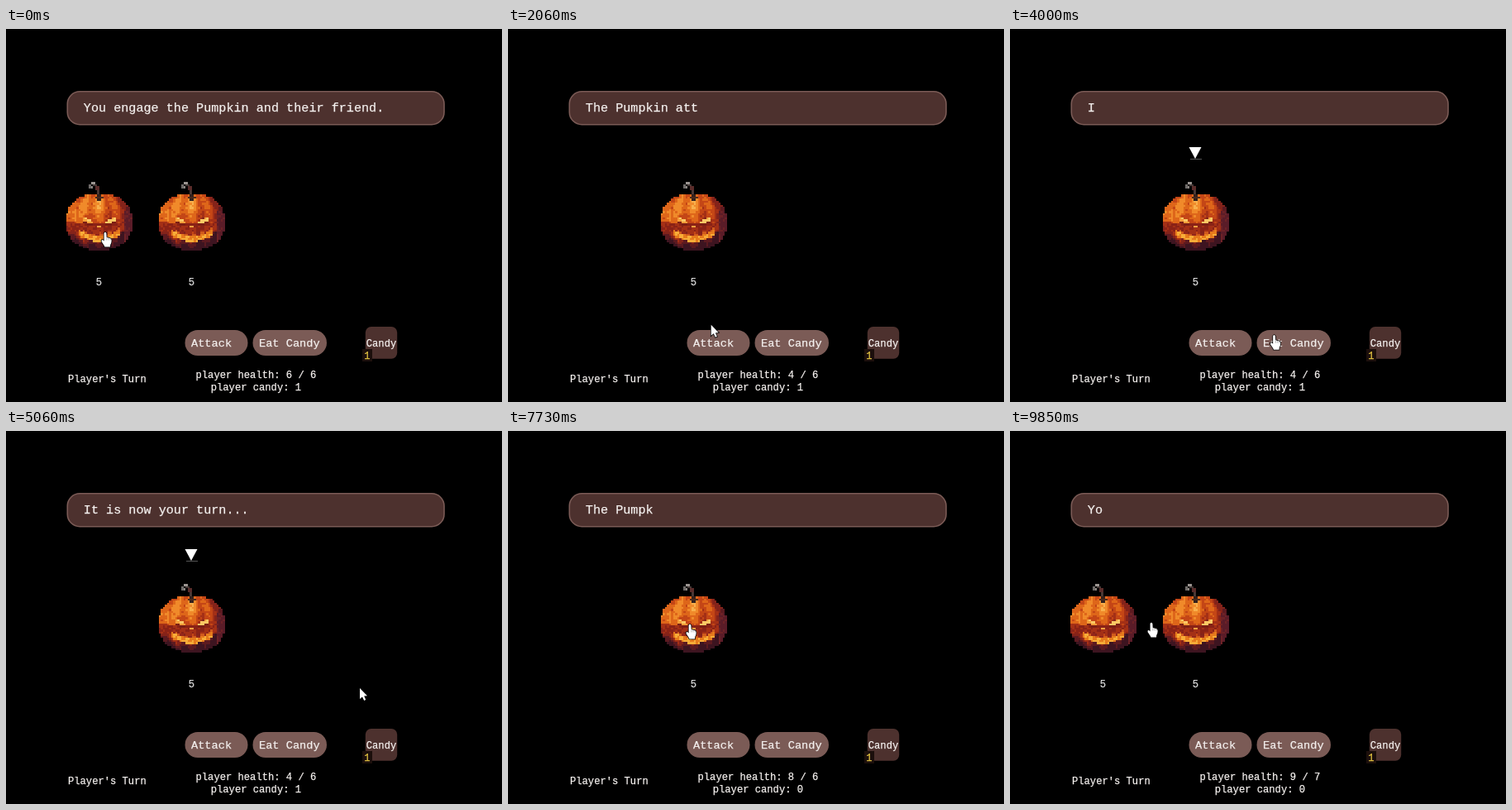
These frames come from a looping animation (600x452 px, 9880 ms). An HTML page with a canvas:

```html
<!DOCTYPE html>
<html lang="en">
<head>
<meta charset="utf-8">
<title>Pumpkin battle</title>
<style>
html, body { margin: 0; width: 100%; height: 100%; overflow: hidden; background: #000; }
canvas { display: block; }
</style>
</head>
<body>
<canvas id="stage" width="600" height="452"></canvas>
<script>
const ctx = document.getElementById('stage').getContext('2d');
const LOOP = 9880;
const CHAR_MS = 17;
const DARK = '#4d312e', LIGHT = '#7b5b56', WHITE = '#f4f0ee';

const ENGAGE = 'You engage the Pumpkin and their friend.';
const TARGET = 'You are targeting the Pumpkin.';
const HURT = 'The Pumpkin attacks you dealing 2 damage.';
const HIT = 'You attack the Pumpkin dealing 6 damage.';

// [start, text, characters already visible]
const messages = [
  [0, ENGAGE, ENGAGE.length],
  [80, TARGET, 0],
  [820, 'You a', 0],
  [1030, HIT, 5],
  [1820, HURT, 0],
  [2800, TARGET, 0],
  [4000, 'It is now your turn...', 0],
  [5990, 'You eat a piece of candy.', 0],
  [7590, HURT, 0],
  [8270, TARGET, 0],
  [8920, '', 0],
  [8950, HIT.replace('6', '8'), 0],
  [9850, 'Yo', 2]
];

// Each list holds [start, value], the last one started is in force.
const turns = [[0, "Player's Turn"], [820, 'Enemy Team Turn'], [1820, "Player's Turn"],
  [5990, 'Enemy Team Turn'], [7200, "Player's Turn"], [8920, 'Enemy Team Turn'], [9650, "Player's Turn"]];
const healths = [[0, '6 / 6'], [1820, '4 / 6'], [5990, '8 / 6'], [9850, '9 / 7']];
const candies = [[0, 1], [5990, 0]];
const enemies = [[0, [112, 224]], [820, [224]], [8920, []], [9850, [112, 224]]];
const markers = [[0, 0], [80, 112], [820, 0], [2800, 224], [5990, 0], [8270, 224], [8920, 0]];

// Pointer tip: [time, x, y]
const path = [
  [0, 120, 247], [280, 120, 247], [760, 251, 388], [1820, 251, 388],
  [2650, 225, 245], [3350, 225, 245], [3790, 255, 350], [4100, 340, 378],
  [4450, 452, 378], [4790, 452, 376], [5060, 428, 312], [5300, 455, 385],
  [5700, 345, 384], [6200, 345, 384], [7300, 220, 235], [8330, 220, 235],
  [8800, 248, 385], [9150, 248, 385], [9700, 171, 233], [LOOP, 171, 233]
];

const current = (list, t) => list.filter(e => e[0] <= t).pop();
const value = (list, t) => current(list, t)[1];

function pointerAt(t) {
  const i = path.findIndex(k => k[0] > t);
  const [t0, x0, y0] = path[i - 1], [t1, x1, y1] = path[i];
  const p = (t - t0) / (t1 - t0), e = p * p * (3 - 2 * p);
  return [x0 + (x1 - x0) * e, y0 + (y1 - y0) * e];
}

function text(str, x, y, size, color = WHITE, align = 'left') {
  ctx.font = `${size}px "Liberation Mono", monospace`;
  ctx.textAlign = align;
  ctx.fillStyle = ctx.strokeStyle = color;
  ctx.lineWidth = 0.25;
  ctx.fillText(str, x, y);
  ctx.strokeText(str, x, y);
}

function box(x, y, w, h, r, fill, stroke) {
  ctx.beginPath();
  ctx.roundRect(x, y, w, h, r);
  ctx.fillStyle = fill;
  ctx.fill();
  if (stroke) {
    ctx.strokeStyle = stroke;
    ctx.lineWidth = 1.6;
    ctx.stroke();
  }
}

function poly(points, fill, stroke) {
  ctx.beginPath();
  points.forEach(([x, y]) => ctx.lineTo(x, y));
  ctx.closePath();
  if (stroke) {
    ctx.strokeStyle = stroke;
    ctx.lineWidth = 1.5;
    ctx.stroke();
  }
  ctx.fillStyle = fill;
  ctx.fill();
}

// The pumpkin is shaded cell by cell on a small grid, then enlarged.
const RAMP = ['#3d1420', '#5c1a20', '#84231a', '#a43016', '#c44616', '#de661a', '#f08a2a', '#f8b04c'];

function makePumpkin() {
  const sprite = document.createElement('canvas');
  sprite.width = 32;
  sprite.height = 33;
  const g = sprite.getContext('2d');
  let seed = 11;
  const rnd = () => (seed = seed * 16807 % 2147483647) / 2147483647;
  const dot = (x, y, w, h, color) => { g.fillStyle = color; g.fillRect(x, y, w, h); };

  for (let y = 5; y < 33; y++) {
    for (let x = 0; x < 32; x++) {
      const n = rnd();
      const u = (x - 15.5) / 16, v = (y - 18.7) / 13.7;
      if (Math.abs(u) ** 2.3 + Math.abs(v) ** 2.3 < 1) dot(x, y, 1, 1, shade(x, y, u, v, n));
    }
  }
  dot(12, 0, 2, 1, '#9a9490');
  dot(11, 1, 1, 2, '#6e6a68');
  dot(12, 2, 1, 1, '#8a8480');
  dot(13, 1, 2, 1, '#463a38');
  dot(14, 2, 2, 2, '#5a2c2a');
  dot(15, 4, 1, 2, '#4a3834');
  dot(15, 6, 2, 3, '#33211c');
  dot(14, 7, 4, 1, '#4a2a1c');
  return sprite;
}

function shade(x, y, u, v, n) {
  const dx = Math.abs(x - 15.5), py = y + 0.5;
  const brow = py - (20.9 - 0.4 * dx);
  const smile = py - (27.4 - 0.03 * dx * dx);
  if (dx > 3 && dx < 8.5) {
    if (Math.abs(brow) < 1) return n < 0.6 ? '#fac864' : '#f49c38';
    if (brow > 0 && brow < 2) return '#7c1e14';
  }
  if (dx < 1 && py > 21 && py < 22) return '#f0a040';
  if (dx < 10) {
    if (Math.abs(smile) < 1.3) return n < 0.4 ? '#f8ac38' : '#e67a1c';
    if (smile < 0 && smile > -2.3) return x % 4 < 2 ? '#d05a1c' : '#94261a';
  }
  if (u > 0.76 && v > -0.4) return n < 0.6 ? '#5a1c28' : '#6e2226';
  if (py > 20 && py < 24.5 && dx < 15) return n < 0.6 ? '#8a2216' : '#a43016';

  const rib = Math.cos(u / Math.sqrt(1 - 0.8 * v * v) * 11);
  const glow = Math.exp(-12 * u * u - 8 * (v + 0.5) ** 2);
  const edge = (u * u + v * v) ** 2;
  let light = 0.52 - 0.34 * v - 0.18 * u + 0.1 * rib + 0.1 * glow + 0.12 * (n - 0.5) - 0.26 * edge;
  if (u < -0.7 && v < 0) light += 0.18;
  return RAMP[Math.max(0, Math.min(7, Math.floor(light * 8)))];
}

const pumpkin = makePumpkin();

function drawMarker(x) {
  poly([[x - 7.5, 144], [x + 7.5, 144], [x, 158]], '#fff');
  ctx.fillStyle = '#555';
  ctx.fillRect(x - 6, 158, 14, 1);
}

function drawHand(x, y) {
  ctx.save();
  ctx.translate(x, y);
  ctx.beginPath();
  ctx.moveTo(-1.4, 1);
  ctx.quadraticCurveTo(0, -1.4, 1.4, 1);
  ctx.lineTo(1.7, 6);
  ctx.lineTo(6, 7.2);
  ctx.quadraticCurveTo(7.8, 7.8, 7.7, 10);
  ctx.quadraticCurveTo(7.5, 13.5, 6.2, 15);
  ctx.lineTo(6, 17.4);
  ctx.lineTo(-0.6, 17.4);
  ctx.quadraticCurveTo(-1.2, 15.5, -4.4, 11.2);
  ctx.quadraticCurveTo(-5, 8.8, -3, 9);
  ctx.lineTo(-1.4, 10.4);
  ctx.closePath();
  ctx.strokeStyle = '#000';
  ctx.lineWidth = 1.5;
  ctx.stroke();
  ctx.fillStyle = '#fff';
  ctx.fill();
  ctx.fillStyle = '#8a8a8a';
  for (const gap of [1.6, 3.7, 5.8]) ctx.fillRect(gap, 6.5, 0.6, 3);
  ctx.restore();
}

function drawArrow(x, y) {
  const shape = [[0, 0], [0, 13], [3, 10.4], [5.2, 15], [7.2, 14], [5.2, 9.6], [9, 9.2]];
  poly(shape.map(([a, b]) => [x + a, y + b]), '#fff', '#000');
}

function drawChoices() {
  box(0, 210, 458, 37.5, 15, LIGHT);
  box(458, 210, 146, 37.5, 15, LIGHT);
  text('Trick!', 7.5, 220, 13.62);
  text('Increase Max Health by 1.', 7.5, 233, 13.62);
  text('You deal damage between current health and max health.', 7.5, 245, 13.62);
  text('Treat!', 465.5, 227, 13.62);
  text('Give me 1 candy.', 465.5, 240, 13.62);
}

function isHot(x, y, foes, choosing) {
  const inside = (l, t, r, b) => x >= l && x <= r && y >= t && y <= b;
  return inside(216, 365, 292, 396) || inside(298, 365, 388, 396) || inside(435, 361, 473, 400)
    || foes.some(f => inside(f - 60, 186, f + 60, 268))
    || choosing && inside(0, 210, 600, 248);
}

function draw(t) {
  const foes = value(enemies, t);
  const choosing = t >= 8920 && t < 9850;

  ctx.fillStyle = '#000';
  ctx.fillRect(0, 0, 600, 452);
  ctx.fillStyle = '#f4f4f4';
  ctx.fillRect(0, 0, 600, 1);

  box(74.3, 76.8, 455.7, 39.9, 15, DARK, LIGHT);
  const [start, line, shown] = current(messages, t);
  text(line.slice(0, shown + Math.floor((t - start) / CHAR_MS) + 1), 93.8, 101, 15.15);

  ctx.imageSmoothingEnabled = false;
  for (const x of foes) {
    ctx.drawImage(pumpkin, x - 39.5, 186, 80, 82.5);
    text('5', x + 0.5, 311, 12.1, '#ddd', 'center');
  }
  const mark = value(markers, t);
  if (mark) drawMarker(mark);
  if (choosing) drawChoices();

  box(216.5, 365, 76, 31, 15.5, LIGHT);
  box(298.5, 365, 89.5, 31, 15.5, LIGHT);
  text('Attack', 224, 385, 13.65);
  text('Eat Candy', 306, 385, 13.65);
  box(434.8, 361, 38.4, 38.7, 7, DARK);
  text('Candy', 454, 385, 12.15, WHITE, 'center');
  ctx.fillStyle = '#1c0f0c';
  ctx.fillRect(431, 388, 12, 15);
  text('1', 437, 400, 12.1, '#e0c040', 'center');

  text(value(turns, t), 75, 428, 12.15);
  text('player health: ' + value(healths, t), 302.4, 423, 12.15, WHITE, 'center');
  text('player candy: ' + value(candies, t), 302.4, 438, 12.15, WHITE, 'center');

  const [x, y] = pointerAt(t);
  (isHot(x, y, foes, choosing) ? drawHand : drawArrow)(x, y);
}

const begin = performance.now();
function tick() {
  draw((performance.now() - begin) % LOOP);
  requestAnimationFrame(tick);
}
tick();
</script>
</body>
</html>
```
